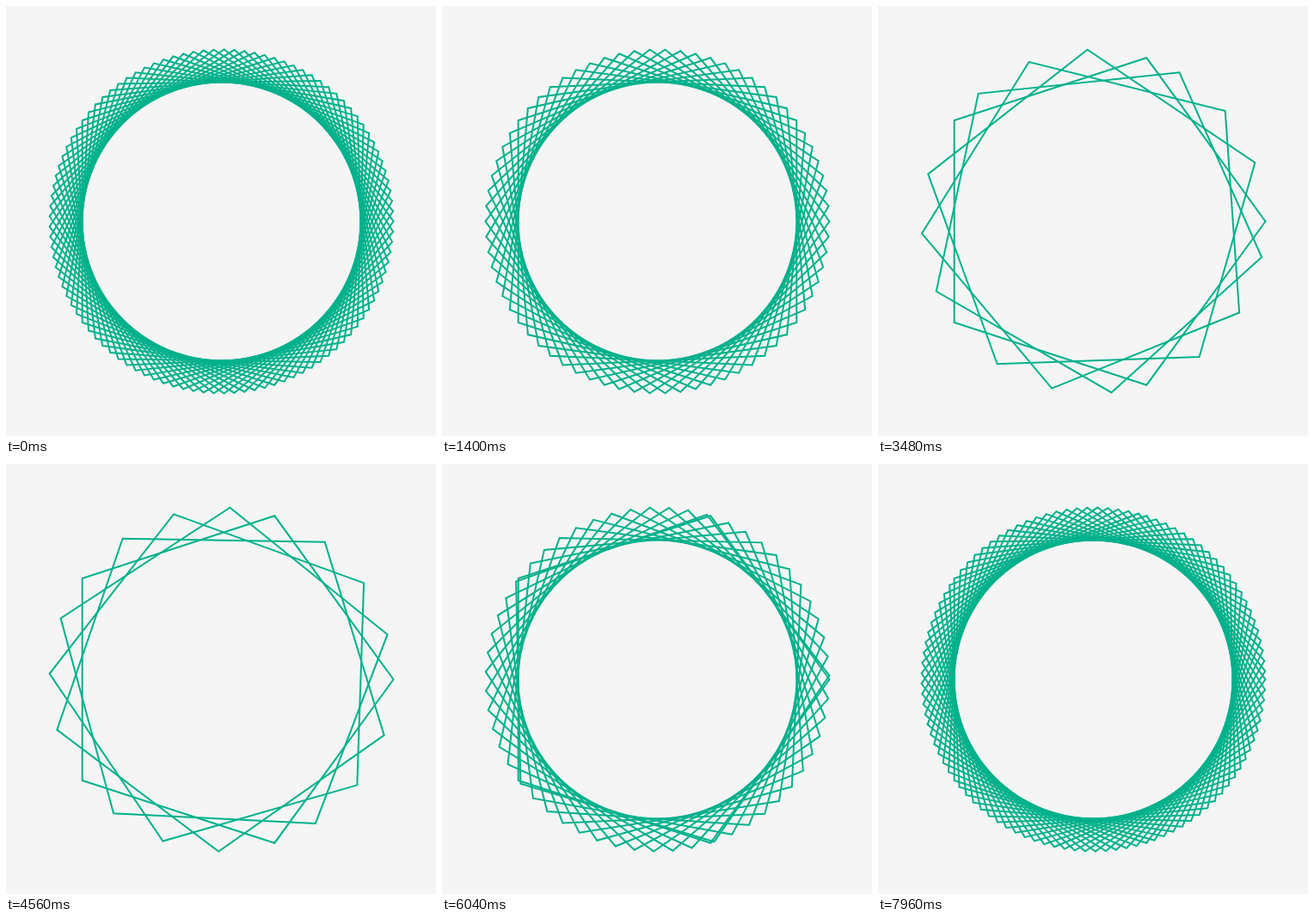
An HTML page with a canvas for the animation above (8 s loop, 500x500 px).

```html
<!DOCTYPE html>
<html lang="en">
<head>
<meta charset="utf-8">
<title>Turning pentagons</title>
<style>
  html, body { margin: 0; width: 100%; height: 100%; overflow: hidden; background: #f5f5f5; }
  canvas { display: block; width: 500px; height: 500px; }
</style>
</head>
<body>
<canvas id="stage" width="500" height="500"></canvas>
<script>
const ctx = document.getElementById('stage').getContext('2d');
const TAU = Math.PI * 2;
const LOOP = 8000, STEP = 40, HALF = 100;
const SIDES = 5, CENTER = 250.5, RADIUS = 200;

function pentagon(turn) {
  ctx.beginPath();
  for (let k = 0; k < SIDES; k++) {
    const a = turn + k * TAU / SIDES;
    ctx.lineTo(CENTER + RADIUS * Math.cos(a), CENTER + RADIUS * Math.sin(a));
  }
  ctx.closePath();
  ctx.stroke();
}

function draw(ms) {
  const offset = Math.floor((ms % LOOP) / STEP) - HALF;
  // The circle is split into 105 parts, down to 5 and back up.
  const parts = SIDES + Math.abs(offset);
  const turn = (offset < 0 ? -1 : 1) * TAU / parts;
  const count = Math.ceil(parts / SIDES);

  ctx.fillStyle = '#f5f5f5';
  ctx.fillRect(0, 0, 500, 500);
  ctx.strokeStyle = '#00b18b';
  ctx.lineWidth = 2;
  ctx.lineJoin = 'miter';
  for (let i = 0; i < count; i++) pentagon(i * turn);
}

const start = performance.now();
function tick() {
  draw(performance.now() - start);
  requestAnimationFrame(tick);
}
tick();
</script>
</body>
</html>
```
